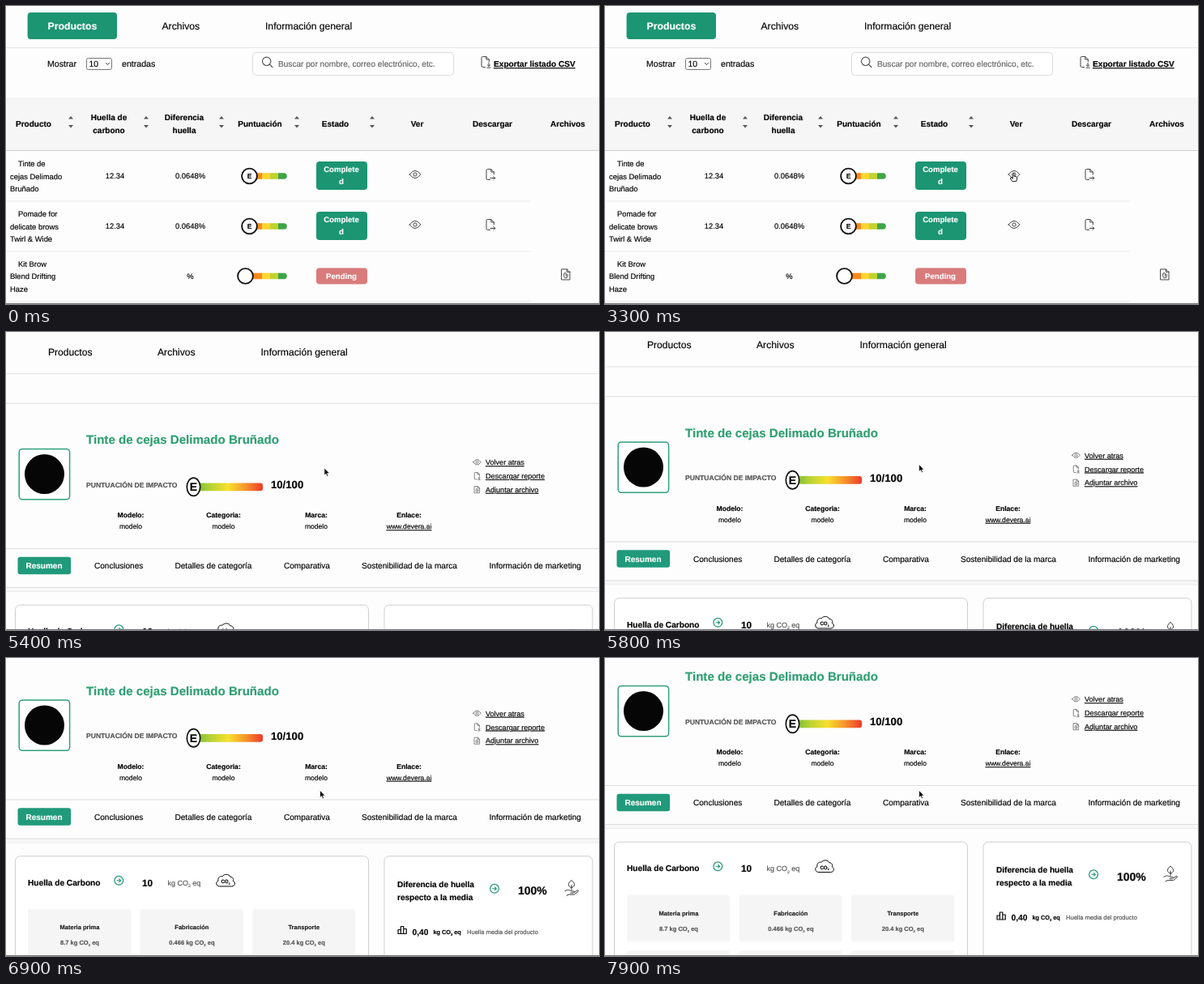
An HTML page that plays this animation: 732x368 px, repeating every 8000 ms.

```html
<!DOCTYPE html>
<html lang="es">
<head>
<meta charset="utf-8">
<title>Panel de productos</title>
<style>
html, body { margin: 0; width: 100%; height: 100%; overflow: hidden; background: #fdfdfd; }
svg { display: block; width: 100vw; height: 100vh; }
text { font-family: "Liberation Sans", Arial, sans-serif; text-rendering: geometricPrecision; white-space: pre; stroke-width: .18px; }
</style>
</head>
<body>
<svg id="stage" viewBox="0 0 732 368"></svg>
<script>
const GREEN = '#1c9573', TEAL = '#209a7a', INK = '#060606';

// Text is placed by the middle of its capitals.
function txt(x, y, str, size, o = {}) {
  const body = str.replace(/&/g, '&amp;')
    .replace(/CO2/g, `CO<tspan font-size="${size * 0.56}" dy="${size * 0.3}">2</tspan><tspan dy="${-size * 0.3}">&#8203;</tspan>`);
  const color = o.c || INK;
  return `<text x="${x}" y="${y + size * 0.36}" font-size="${size}" fill="${color}" stroke="${color}"` +
    (o.b ? ' font-weight="700"' : '') + (o.mid ? ' text-anchor="middle"' : '') +
    (o.u ? ' text-decoration="underline"' : '') + `>${body}</text>`;
}
const rect = (x, y, w, h, fill, r = 0, stroke = 'none', sw = 1) =>
  `<rect x="${x}" y="${y}" width="${w}" height="${h}" rx="${r}" fill="${fill}" stroke="${stroke}" stroke-width="${sw}"/>`;
const path = (d, stroke = '#444', sw = 1, fill = 'none') =>
  `<path d="${d}" fill="${fill}" stroke="${stroke}" stroke-width="${sw}" stroke-linecap="round" stroke-linejoin="round"/>`;
const circle = (x, y, r, fill, stroke = 'none', sw = 1) =>
  `<circle cx="${x}" cy="${y}" r="${r}" fill="${fill}" stroke="${stroke}" stroke-width="${sw}"/>`;
const at = (x, y, s, body) => `<g transform="translate(${x} ${y}) scale(${s})">${body}</g>`;
const rule = (y, c, w = 732) => rect(0, y, w, 1, c);

const eye = (x, y, s = 1) => at(x, y, s,
  path('M-6.8 0Q0 -9.4 6.8 0Q0 9.4 -6.8 0Z') + circle(0, 0, 2.1, 'none', '#444'));
const sheet = 'M-.5 6.5H-3.5Q-5 6.5 -5 5V-5Q-5 -6.5 -3.5 -6.5H.8L4.3 -3V0M.8 -6.5V-3H4.3';
const docNext = (x, y) => at(x, y, 1, path(sheet + 'M0 4.5H5.8M3.8 2.5L5.8 4.5L3.8 6.5'));
const docDown = (x, y, s = 1) => at(x, y, s, path(sheet + 'M4 1.5V5.4M2.2 3.8L4 5.5L5.8 3.8M2 7.2H6'));
const docClip = (x, y, s = 1) => at(x, y, s,
  path('M-5 -6.5H1.5L5 -3V6.5H-5ZM1.5 -6.5V-3H5') +
  path('M2.2 0V2.2A2.2 2.2 0 0 1 -2.2 2.2V-.5A1.4 1.4 0 0 1 .6 -.5V2'));
const goArrow = (x, y) => circle(x, y, 5.4, 'none', GREEN, 1.2) +
  path(`M${x - 2.4} ${y}h4.6m-1.8 -1.9l1.9 1.9l-1.9 1.9`, GREEN, 1.1);

function topTabs(first) {
  const xs = first ? [192.5, 320] : [187, 314.5];
  const names = ['Archivos', 'Información general'];
  return (first
    ? rect(26.6, 8, 110.4, 33, GREEN, 4) + txt(51.5, 24.5, 'Productos', 12.3, { b: 1, c: '#fff' })
    : txt(52, 24.5, 'Productos', 12.1)) +
    names.map((n, i) => txt(xs[i], 24.5, n, 12.15)).join('') + rule(51, '#e6e6e6');
}

function score(y, letter) {
  const x = letter ? 300.5 : 295.5;
  return rect(x, y - 3.8, 316 - x, 7.6, '#f48a1c') + rect(316, y - 3.8, 10, 7.6, '#fad532') +
    rect(326, y - 3.8, 10, 7.6, '#c2d22f') +
    `<path d="M336 ${y - 3.8}h7a3.8 3.8 0 0 1 0 7.6h-7z" fill="#3fa548"/>` +
    circle(x, y, 9.4, '#fff', '#111', 1.9) + txt(x, y, letter, 8.5, { b: 1, mid: 1 });
}

function row(y, lines, done) {
  let s = lines.map((l, i) => txt(i ? 5 : 15, y - 15 + i * 15.4, l, 9.4)).join('');
  s += score(y, done ? 'E' : '') + rule(y + 30.5, '#ececec', 648);
  const white = { b: 1, mid: 1, c: '#fff' };
  if (!done) return s + txt(227.5, y, '%', 9.4, { mid: 1 }) + rect(383, y - 10, 63, 20, '#d97b7b', 4) +
    txt(414, y, 'Pending', 9.6, white) + docClip(691, y - 2);
  return s + txt(134.5, y, '12.34', 9.4, { mid: 1 }) + txt(227.5, y, '0.0648%', 9.4, { mid: 1 }) +
    rect(383, y - 18, 63, 35, GREEN, 4) + txt(414, y - 8, 'Complete', 9.6, white) +
    txt(414, y + 7, 'd', 9.6, white) + eye(505, y - 2) + docNext(598, y - 2);
}

function listPage() {
  const head = { b: 1, mid: 1 };
  let s = topTabs(true) + txt(51, 71.5, 'Mostrar', 10.6) +
    rect(99.5, 64.5, 31, 14, '#fff', 2, '#767676') + txt(102.5, 71.5, '10', 10.4) +
    path('M123.5 70.5l2 2l2 -2', '#333') + txt(143, 71.5, 'entradas', 10.6) +
    rect(304.5, 57.5, 248, 28, '#fff', 4, '#dadada') +
    circle(321.7, 68.3, 5.2, 'none', '#555', 1.2) + path('M325.5 72.2l3.3 3.3', '#555', 1.2) +
    txt(336, 71.5, 'Buscar por nombre, correo electrónico, etc.', 10.1, { c: '#666' }) +
    docDown(592, 69) + txt(602, 71.5, 'Exportar listado CSV', 10.15, { b: 1, u: 1 }) +
    rect(0, 113, 732, 65, '#f6f6f6') + rule(178, '#cfcfcf');
  const cols = [[34, 'Producto'], [127, 'Huella de|carbono'], [220, 'Diferencia|huella'], [313.5, 'Puntuación'],
    [406.5, 'Estado'], [507.5, 'Ver'], [600.5, 'Descargar'], [693.5, 'Archivos']];
  cols.forEach(([x, label], i) => {
    const parts = label.split('|');
    parts.forEach((p, k) => s += txt(x, parts.length > 1 ? 137.5 + 16 * k : 145.5, p, 10, head));
    const a = 80 + 93 * i;
    if (i < 5) s += `<path d="M${a - 3} 139.5l3 -3.5l3 3.5zM${a - 3} 147l3 3.5l3 -3.5z" fill="#555"/>`;
  });
  return s + row(210, ['Tinte de', 'cejas Delimado', 'Bruñado'], true) +
    row(272, ['Pomade for', 'delicate brows', 'Twirl & Wide'], true) +
    row(333.5, ['Kit Brow', 'Blend Drifting', 'Haze'], false);
}

function detailPage() {
  let s = topTabs(false) + rule(87.7, '#dedede') +
    rect(16.2, 144.4, 62.4, 62.4, '#fff', 4, '#2f9f7b', 1.5) + circle(47.5, 175.5, 24.5, INK) +
    txt(99, 133, 'Tinte de cejas Delimado Bruñado', 15.1, { b: 1, c: '#2f9f72' }) +
    txt(99, 188.7, 'PUNTUACIÓN DE IMPACTO', 8.57, { b: 1, c: '#555' }) +
    rect(232, 186.6, 85, 9.6, 'url(#heat)', 3) +
    '<ellipse cx="231.5" cy="191.3" rx="8.2" ry="11.1" fill="#fff" stroke="#111" stroke-width="1.7"/>' +
    txt(231.5, 191.4, 'E', 14, { b: 1, mid: 1 }) + txt(327, 188.5, '10/100', 13.15, { b: 1 });
  [['Modelo:', 'modelo'], ['Categoria:', 'modelo'], ['Marca:', 'modelo'], ['Enlace:', 'www.devera.ai']]
    .forEach(([k, v], i) => {
      const x = 154 + 114.5 * i;
      s += txt(x, 226.3, k, 8.6, { b: 1, mid: 1 }) + txt(x, 240.2, v, 8.55, { mid: 1, u: i === 3 });
    });
  ['Volver atras', 'Descargar reporte', 'Adjuntar archivo'].forEach((l, i) =>
    s += txt(592, 161 + 16.8 * i, l, 9.05, { u: 1 }));
  s += eye(581.5, 160.7, 0.7) + docDown(581.5, 177.7, 0.65) + docClip(581.5, 194.7, 0.62);

  s += rule(267, '#dedede') + rect(14.5, 277.7, 65.6, 21.5, TEAL, 3) +
    txt(24.5, 288.4, 'Resumen', 10, { b: 1, c: '#fff' });
  [[109, 'Conclusiones'], [208.5, 'Detalles de categoría'], [343, 'Comparativa'],
    [439, 'Sostenibilidad de la marca'], [596.5, 'Información de marketing']]
    .forEach(([x, l]) => s += txt(x, 288.4, l, 10.05));
  s += rect(0, 315, 732, 5, '#f7f7f7') + rule(315, '#dedede') + rule(320, '#ebebeb');

  s += rect(11.5, 337.2, 436, 300, '#fff', 6, '#cfcfcf') + rect(467, 337.2, 257, 300, '#fff', 6, '#cfcfcf') +
    txt(27, 369.8, 'Huella de Carbono', 10.15, { b: 1 }) + goArrow(139.3, 367.3) +
    txt(168, 369.8, '10', 11.8, { b: 1 }) + txt(199.5, 369.8, 'kg CO2 eq', 9, { c: '#555' }) +
    at(271, 367.3, 1, path('M-7.5 7.2C-12 7.2 -12.5 1.5 -9 .3C-10 -4 -6 -6 -3.8 -5C-2 -8.4 4.5 -8.3 5.8 -4.5C9 -4.6 10.5 -1.5 9.2 .5C12.6 1.8 12 7.2 8 7.2Z', INK) +
      txt(0, 1, 'CO2', 6.2, { b: 1, mid: 1 }));
  [['Materia prima', '8.7'], ['Fabricación', '0.466'], ['Transporte', '20.4']].forEach(([l, v], i) => {
    const x = 27 + 138.4 * i, mid = x + 64;
    s += rect(x, 402.5, 127.5, 58, '#f5f5f5', 4) + rect(x, 471, 127.5, 58, '#f5f5f5', 4) +
      txt(mid, 425, l, 7.5, { b: 1, mid: 1, c: '#222' }) +
      txt(mid, 444, v + ' kg CO2 eq', 7.5, { b: 1, mid: 1, c: '#555' });
  });
  s += txt(483, 371.8, 'Diferencia de huella', 10.05, { b: 1 }) + txt(483, 387.8, 'respecto a la media', 10.05, { b: 1 }) +
    goArrow(603, 377.3) + txt(632, 379.5, '100%', 14, { b: 1 }) +
    at(698, 377, 1, path('M0 2V-4M0 -1C-5 -2 -4.5 -7 0 -10C4.5 -7 5 -2 0 -1M-8 3.2C-4 .6 -2 2.5 0 3.5H3Q4.5 5 2.5 5.6H-1M4 4.5L7.5 2.2Q9.2 2.4 8 4L3.5 7.6H-4L-6 9', '#222', 0.9)) +
    path('M484 433v-5h3.4v5zM487.4 433v-9h3.4v9zM490.8 433v-6h3.4v6z', INK, 1.2) +
    txt(501.5, 430.5, '0,40', 10.2, { b: 1 }) + txt(527.5, 430.5, 'kg CO2 eq', 7.3, { b: 1 }) +
    txt(569, 430.5, 'Huella media del producto', 7.57, { c: '#555' });
  return s;
}

const stops = ['#6fb83f', '#b9d334', '#f7e02c', '#f6952b', '#ee3a2c']
  .map((c, i) => `<stop offset="${i / 4}" stop-color="${c}"/>`).join('');
const stage = document.getElementById('stage');
stage.innerHTML = `<defs><linearGradient id="heat">${stops}</linearGradient></defs>` +
  rect(0, 0, 732, 368, '#fdfdfd') +
  `<g id="list">${listPage()}</g><g id="detail">${detailPage()}</g>` + rect(0, 367, 732, 1, '#777') +
  `<g id="arrow">${path('M0 0V9L2.1 7.1L3.5 10.2L5 9.6L3.7 6.5H6.4Z', '#fff', 0.7, '#111')}</g>` +
  `<g id="hand">${path('M-.9 1Q0 -.6 .9 1V4.2L4 5Q5 5.4 4.7 7L3.8 10.6H-1.2L-3.6 7Q-3.6 5.6 -2.2 6L-.9 7Z', '#222', 1, '#fff')}</g>`;
const [list, detail, arrow, hand] = ['list', 'detail', 'arrow', 'hand'].map(id => document.getElementById(id));

const moves = [[1900, 588, -18], [2200, 575, 55], [2500, 540, 160], [2600, 540, 160], [3300, 504, 206],
  [3800, 504, 206], [4300, 436, 204], [4600, 436, 204], [4700, 430.5, 200], [5500, 387.5, 163.5]];
const scrolls = [[5500, 0], [5800, 8.5], [6200, 17], [6300, 17], [6400, 24], [6600, 54], [6800, 85],
  [6900, 92.5], [7200, 92.5], [7900, 110]];

function track(keys, t, k) {
  let i = 0;
  while (i < keys.length - 1 && keys[i + 1][0] <= t) i++;
  const a = keys[i], b = keys[i + 1];
  if (!b || t <= a[0]) return a[k];
  return a[k] + (b[k] - a[k]) * (t - a[0]) / (b[0] - a[0]);
}
const show = (el, on) => el.setAttribute('visibility', on ? 'visible' : 'hidden');

function draw(now) {
  const t = Math.floor((now % 8000) / 100) * 100;
  const opened = t >= 3900, pointing = t >= 3100 && !opened;
  show(list, !opened);
  show(detail, opened);
  detail.setAttribute('transform', `translate(0 ${-track(scrolls, t, 1)})`);
  const pos = `translate(${track(moves, t, 1)} ${track(moves, t, 2)})`;
  arrow.setAttribute('transform', pos);
  hand.setAttribute('transform', pos);
  show(arrow, t >= 2000 && !pointing);
  show(hand, pointing);
}

let start = null;
function tick(now) {
  if (start === null) start = now;
  draw(now - start);
  requestAnimationFrame(tick);
}
draw(0);
requestAnimationFrame(tick);
</script>
</body>
</html>
```
